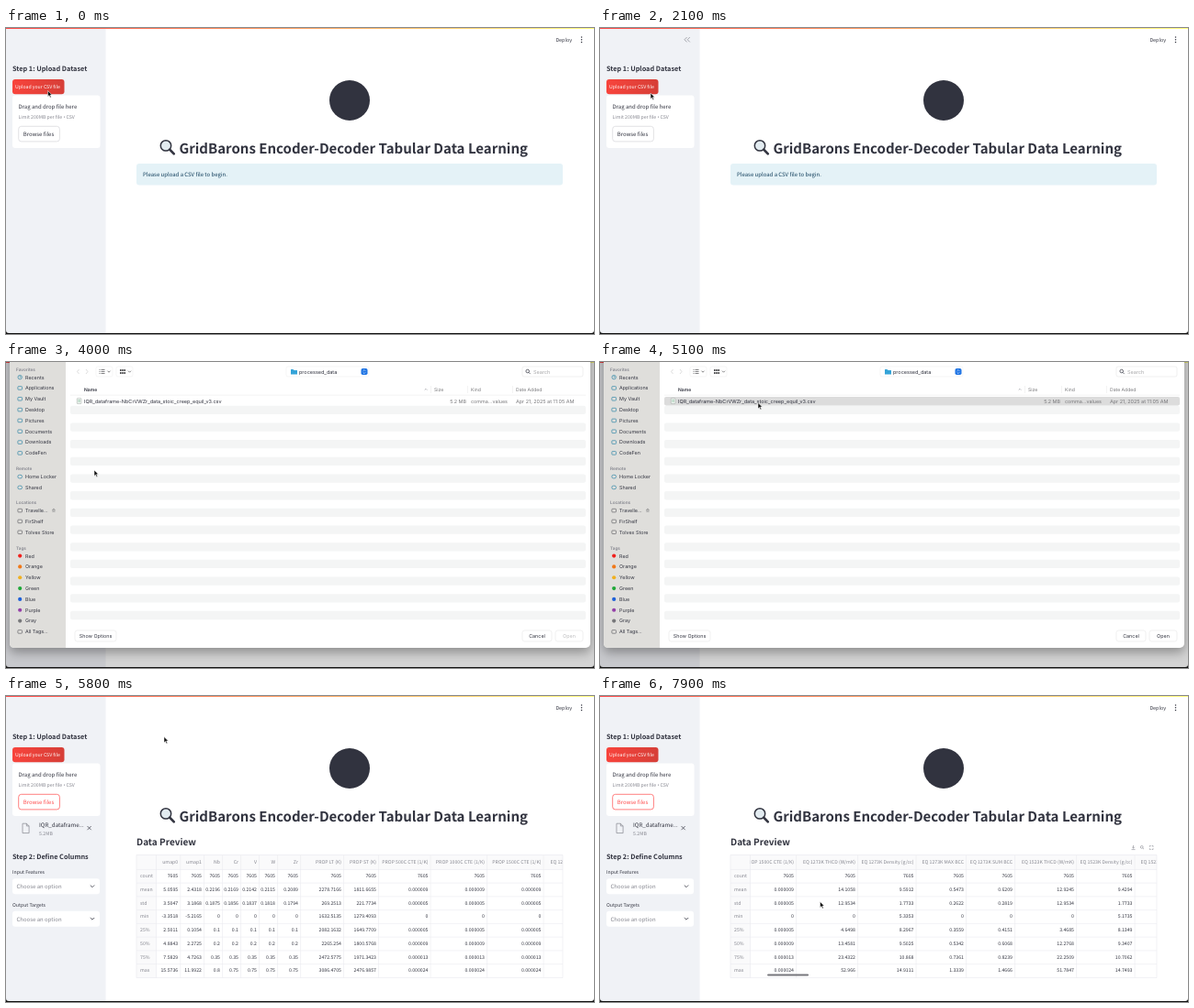
Animation of 640 by 334 pixels, one loop 8 s. Source, as an HTML page:

```html
<!DOCTYPE html>
<html lang="en">
<head>
<meta charset="utf-8">
<title>Upload and preview</title>
<style>
html, body { margin: 0; width: 100%; height: 100%; overflow: hidden; background: #fff; }
svg { display: block; width: 100%; height: 100%; text-rendering: geometricPrecision; }
text { white-space: pre; }
#page { font-family: "Noto Sans CJK SC", "Noto Sans CJK JP", "Noto Sans CJK", "Open Sans", sans-serif; }
#dialog { font-family: Inter, Roboto, sans-serif; }
#sheet { filter: drop-shadow(0 5px 6px #0005); }
</style>
</head>
<body>
<svg id="stage" viewBox="0 0 640 334"></svg>
<script>
const LOOP = 8000, STEP = 100;
const INK = '#31333f', MUTED = '#85868f', RED = '#ff4b4b', GRID = '#e9eaee', PANEL = '#f0f2f6';
const LABEL = '#77777a', EDGE = '#e6e6e6';

// Markup helpers
const text = (x, y, str, size = 6, fill = INK, more = '') =>
  `<text x="${x}" y="${y}" font-size="${size}" fill="${fill}" ${more}>${str}</text>`;
const rect = (x, y, w, h, fill, r = 0, more = '') =>
  `<rect x="${x}" y="${y}" width="${w}" height="${h}" rx="${r}" fill="${fill}" ${more}/>`;
const line = (d, stroke = INK, width = 0.7, more = '') =>
  `<path d="${d}" fill="none" stroke="${stroke}" stroke-width="${width}" ${more}/>`;
const circle = (x, y, r, fill, more = '') =>
  `<circle cx="${x}" cy="${y}" r="${r}" fill="${fill}" ${more}/>`;
const group = (id, body) => `<g id="${id}">${body}</g>`;
const outline = (color, width = 0.6) => `stroke="${color}" stroke-width="${width}"`;
const BOLD = 'font-weight="700"', END = 'text-anchor="end"';

// Statistics: every cell follows from the mean, spread and rounding of its column
const column = (name, width, mean, std, step = 1e-4, floor = 0) => ({ name, width, mean, std, step, floor });
const columns = [
  column('umap0', 26.3, 5.0595, 3.5047, 1e-4, -9),
  column('umap1', 25.8, 2.4318, 3.1868, 1e-4, -9),
  ...['Nb', 'Cr', 'V', 'W'].map((name, i) => column(name, 20, 0.2196 - i * 0.0027, 0.1875 - i * 0.0019, 0.05)),
  column('Zr', 25, 0.2089, 0.1794, 0.05),
  column('PROP LT (K)', 47, 2278.7166, 269.2513),
  column('PROP ST (K)', 38, 1811.6655, 221.7734),
  ...[500, 1000, 1500].map(c => column(`PROP ${c}C CTE (1/K)`, 41.5 + 5 * `${c}`.length, 9e-6, 5e-6, 1e-6)),
  ...[1273, 1523].flatMap((k, i) => [
    column(`EQ ${k}K THCD (W/mK)`, 67, 14.1058 - i * 1.1813, 12.9534),
    column(`EQ ${k}K Density (g/cc)`, 63.5, 9.5912 - i * 0.1618, 1.7733),
    column(`EQ ${k}K MAX BCC`, 54.5, 0.5473, 0.2622),
    column(`EQ ${k}K SUM BCC`, 53, 0.6209, 0.2819)
  ])
];
const spread = z => c => Math.max(c.floor, Math.round((c.mean + z * c.std) / c.step) * c.step);
const rows = {
  count: () => 7605, mean: c => c.mean, std: c => c.std, min: spread(-2.4),
  '25%': spread(-0.73), '50%': spread(-0.05), '75%': spread(0.72), max: spread(3)
};
const format = v => `${+v.toFixed(v < 1e-3 ? 6 : 4)}`;

function table() {
  const left = 142, top = 173.5, body = 163.5, right = 606, bottom = 307.5, pitch = 14.75;
  const rowY = i => 198.2 + i * pitch;
  let cells = '', labels = '', rules = `M${left} ${top}H${right}V${bottom}H${left}ZM${body} ${top}V${bottom}`;
  let edge = body;
  for (const c of columns) {
    edge += c.width;
    cells += text(edge - 2.6, 183.4, c.name, 5.2, MUTED, END) + line(`M${edge} ${top}V${bottom}`, GRID, 0.6);
    Object.values(rows).forEach((stat, i) => cells += text(edge - 2.6, rowY(i), format(stat(c)), 5.2, INK, END));
  }
  Object.keys(rows).forEach((label, i) => {
    rules += `M${left} ${189.4 + i * pitch}H${right}`;
    labels += text(146, rowY(i), label, 5.2, MUTED);
  });
  return rect(left, top, right - left, 16, '#fafafb') + rect(left, top, body - left, bottom - top, '#fafafb') +
    `<clipPath id="tableView">${rect(body, top, right - body, bottom - top, '#fff')}</clipPath>` +
    `<g clip-path="url(#tableView)">${group('cells', cells)}</g>` + labels + line(rules, GRID, 0.6) +
    rect(0, 303.6, 45, 2, '#77777c', 1, 'id="scrollbar"');
}

const selectBox = (label, y) => text(7, y, label, 5.2) + rect(7, y + 5, 95, 17, '#fff', 3) +
  text(11.5, y + 15.8, 'Choose an option', 6, MUTED) + line(`M91.8 ${y + 12.3}l2.2 2.2l2.2-2.2`, INK, 0.8);

const page = () => rect(0, 0, 640, 334, '#fff') + rect(0, 0, 108.5, 334, PANEL) + rect(0, 0, 640, 1, 'url(#ribbon)') +
  text(616, 15, 'Deploy', 5.4, INK, END) + [10, 12.7, 15.4].map(y => circle(626.5, y, 0.75, INK)).join('') +
  group('collapse', line('M94.6 10l-2.6 2.7l2.6 2.7M97.8 10l-2.6 2.7l2.6 2.7', MUTED)) +
  text(7, 46.7, 'Step 1: Upload Dataset', 7.3, INK, BOLD) +
  rect(7, 56, 56.5, 16.3, 'url(#button)', 3) + text(10, 66, 'Upload your CSV file', 5.2, '#fff', 'font-weight="500"') +
  rect(7, 73.5, 95.5, 57.5, '#fff', 3) + text(13.5, 88.2, 'Drag and drop file here') +
  text(13.5, 98.8, 'Limit 200MB per file <tspan font-family="Open Sans, sans-serif">•</tspan> CSV', 5.2, MUTED) +
  rect(13.7, 107.3, 44.7, 16.6, '#fff', 3, 'id="browseBox" stroke-width=".7"') +
  text(18.7, 117.8, 'Browse files', 6, INK, 'id="browseText"') +
  circle(374, 79, 22, INK) +
  circle(174, 128.4, 5.7, '#e2ebf0', outline(INK, 1.5)) + line('M178.2 132.6l4.6 4.8', INK, 2.6, 'stroke-linecap="round"') +
  text(568, 136.6, 'GridBarons Encoder-Decoder Tabular Data Learning', 15, INK, BOLD + ' ' + END) +
  group('notice', rect(142, 148, 464, 23.4, '#e4f2f7', 3) + text(149, 161.8, 'Please upload a CSV file to begin.', 6, '#123f5c')) +
  group('file', line('M18 139.2h4.4l2.7 2.7v7.7h-7.1zM22.4 139.2v2.7h2.7', MUTED) +
    text(36, 143.2, 'IQR_dataframe...', 6.2) + text(36, 152, '5.2MB', 5.2, MUTED) +
    line('M88.5 142l4.2 4.2M92.7 142l-4.2 4.2', INK)) +
  group('preview', text(7, 178, 'Step 2: Define Columns', 7.3, INK, BOLD) +
    selectBox('Input Features', 194.2) + selectBox('Output Targets', 229.7) +
    text(142, 163.2, 'Data Preview', 10, INK, BOLD) + table()) +
  group('anchor', line('M214.4 159h-1.2a1.6 1.6 0 0 0 0 3.2h1.2M216 159h1.2a1.6 1.6 0 0 1 0 3.2h-1.2M213.6 160.6h3.2', MUTED, 0.6)) +
  group('tools', line('M580.5 163v3.2m-1.3-1.3l1.3 1.3l1.3-1.3M578.5 167.6h4M592 167.2l-1.3-1.3M598.3 164.8v-1.3h1.3M600.7 163.5h1.3v1.3M602 166.2v1.3h-1.3M599.6 167.5h-1.3v-1.3', MUTED, 0.6) +
    circle(589.7, 164.9, 1.4, 'none', outline(MUTED)));

// File picker sidebar: heading, baseline, items
const places = [
  ['Favorites', 9.5, ['Recents', 'Applications', 'My Vault', 'Desktop', 'Pictures', 'Documents', 'Downloads', 'CodeFen']],
  ['Remote', 118, ['Home Locker', 'Shared']],
  ['Locations', 155, ['Travelle…', 'FirShelf', 'Tolvex Store']],
  ['Tags', 204.5, ['Red', 'Orange', 'Yellow', 'Green', 'Blue', 'Purple', 'Gray', 'All Tags…']]
];
const tagColors = ['#f0201c', '#f07818', '#f0b020', '#1ea838', '#1e60d8', '#9440a8', '#77777a'];

function placeIcon(section, i, y) {
  if (section === 3 && i < 7) return circle(15.2, y, 2.1, tagColors[i]);
  const color = outline(section < 2 ? '#2f86a6' : '#66666a', 0.7);
  if (section === 0 && i === 0) return circle(15.2, y, 2.2, 'none', color) + line(`M15.2 ${y - 1.4}v1.4h1.2`, '#2f86a6', 0.6);
  return rect(12.9, y - 1.8, 4.6, 3.6, 'none', section === 1 ? 1.6 : 0.7, color);
}

const button = (x, w, label, more = '') => rect(x, 293, w, 12, '#fff', 2.5, outline(EDGE)) +
  text(x + w / 2, 301, label, 5.4, INK, 'text-anchor="middle" ' + more);

function dialog() {
  let out = rect(4, -20, 632, 332, '#fff', 5, 'id="sheet"') + '<path d="M4-20H65V312H9Q4 312 4 307Z" fill="#dfdedb"/>';
  places.forEach(([heading, y, items], section) => {
    out += text(11, y, heading, 4.7, MUTED, 'font-weight="600"');
    items.forEach((item, i) => {
      const base = y + 9 + i * 11.83;
      out += placeIcon(section, i, base - 1.9) + text(21, base, item, 5.4);
    });
  });
  out += line('M53.5 163.2h-3.2M50.4 161.9l1.5-2l1.5 2z', '#66666a', 0.5);
  out += line('M79.5 8l-2 2.5l2 2.5M87 8l2 2.5l-2 2.5', '#cfcfcf') +
    rect(98, 5, 18, 11, 'none', 2, outline('#f0f0f0')) + rect(120, 5, 18, 11, 'none', 2, outline('#f0f0f0')) +
    line('M101.5 8.5h1M103.5 8.5h4M101.5 10.5h1M103.5 10.5h4M101.5 12.5h1M103.5 12.5h4M110.5 9.7l1.5 1.5l1.5-1.5M133 9.7l1.5 1.5l1.5-1.5', '#4a4a4c') +
    line('M124 9h6M124 12h6', '#4a4a4c', 1.8, 'stroke-dasharray="1.6 .6"') +
    rect(305, 5, 90, 11, '#fff', 2, outline('#f0f0f0')) +
    '<path d="M310 8h2.6l.8.9h3.6v4.6h-7z" fill="#35a4d8"/>' + text(319, 12.6, 'processed_data', 5.5) +
    rect(386.5, 7, 7, 7, '#1f74e4', 1.8) + line('M388.7 9.8l1.3-1.3l1.3 1.3M388.7 11.3l1.3 1.3l1.3-1.3', '#fff', 0.6) +
    rect(562, 5, 66, 11, '#fff', 2, outline(EDGE)) + circle(567.7, 10, 1.8, 'none', outline(INK, 0.7)) +
    line('M569 11.4l1.7 1.7') + text(574, 12.6, 'Search', 5.5, '#a8a8aa') +
    text(85, 31.6, 'Name', 5, INK, 'font-weight="600"') + line('M455.7 30.6l1.3-1.3l1.3 1.3', MUTED, 0.6);
  [['Size', 466], ['Kind', 506], ['Date Added', 555]].forEach(([name, x]) =>
    out += text(x, 31.6, name, 5.1, LABEL) + line(`M${x - 3.5} 26v8`, EDGE, 0.5));
  out += line('M70 36.2H631', EDGE, 0.5);
  for (let i = 0; i < 13; i++) out += rect(70, 47.7 + i * 18.68, 561, 9.3, '#f4f5f5', 2);
  return out + rect(70, 38, 561, 9.5, '#dcdcdc', 2, 'id="selection"') +
    rect(77.3, 39.7, 4.6, 5.8, '#fff', 0.5, outline('#8a9a90', 0.5)) + line('M78.3 41.6h2.6M78.3 43.3h2.6', '#4a9a68', 0.6) +
    text(85, 44.6, 'IQR_dataframe-NbCrVWZr_data_stoic_creep_equil_v3.csv', 5.5) +
    text(501, 44.6, '5.2 MB', 5.4, LABEL, END) + text(506, 44.6, 'comma…values', 5.4, LABEL) +
    text(555, 44.6, 'Apr 21, 2025 at 11:05 AM', 5.45, LABEL) +
    button(75, 45, 'Show Options') + button(562, 32, 'Cancel') + button(598, 30, 'Open', 'id="open"');
}

const gradient = (id, from, to) =>
  `<linearGradient id="${id}"><stop stop-color="${from}"/><stop offset="1" stop-color="${to}"/></linearGradient>`;

document.getElementById('stage').innerHTML =
  gradient('ribbon', '#ff4b4b', '#fffd80') + gradient('button', '#f8443c', '#d63f38') +
  group('page', page()) + rect(0, 0, 640, 334, '#000', 0, 'id="backdrop"') + group('dialog', dialog()) +
  '<path d="M0 330Q0 333 3 333H637Q640 333 640 330V334H0Z" fill="#111"/>' +
  group('cursor',
    group('arrow', '<path d="M0 0V6.4L1.5 5L2.6 7.4L3.7 6.9L2.6 4.6H4.6Z" fill="#111" stroke="#fff" stroke-width=".5"/>') +
    group('hand', '<path d="M-1.5 0.6Q-.8-.4 0 .6L.5 3L3 3.5Q3.8 4 3.3 5.5L2.6 7.4H-.8L-2.8 4.6Q-2.6 3.8-1.2 4.6Z" fill="#fff" stroke="#222" stroke-width=".7"/>') +
    group('beam', line('M-1.5-3.2Q0-3.2 0-2.2Q0-3.2 1.5-3.2M0-2.2V2.2M-1.5 3.2Q0 3.2 0 2.2Q0 3.2 1.5 3.2', '#111', 0.8)));

// Motion
const $ = id => document.getElementById(id);
const ramp = (t, from, to) => Math.max(0, Math.min(1, (t - from) / (to - from)));
const ease = v => v * v * (3 - 2 * v);
const set = (id, attributes) => Object.entries(attributes).forEach(([name, v]) => $(id).setAttribute(name, v));
const show = (id, on) => set(id, { display: on ? 'inline' : 'none' });
const path = [
  [0, 45.5, 68.5], [500, 47, 69.5], [2100, 55, 71], [3000, 54, 74], [3600, 39, 111.5], [3800, 39, 111.5],
  [4000, 96, 118], [4800, 172, 44.5], [6400, 172, 44.5], [6900, 160.3, 155], [7300, 239.5, 224.5], [LOOP, 239.5, 224.5]
];

function cursorAt(t) {
  const i = path.findIndex(p => p[0] > t), [t0, x0, y0] = path[i - 1], [t1, x1, y1] = path[i];
  const k = ease(ramp(t, t0, t1));
  return [x0 + (x1 - x0) * k, y0 + (y1 - y0) * k];
}

function draw(t) {
  const [x, y] = cursorAt(t);
  const opacity = ramp(t, 3820, 3980) * (1 - ramp(t, 5240, 5440));
  const selected = t >= 5000, loaded = t >= 5800;
  const hover = t > 3800 || (x > 13 && x < 59 && y > 107);
  const scroll = 371.5 * ease(ramp(t, 7250, 7900));

  show('collapse', t >= 500 && t < 3900);
  set('browseBox', { stroke: hover ? RED : '#d6d6da' });
  set('browseText', { fill: hover ? RED : INK });

  show('dialog', opacity > 0);
  set('dialog', { opacity, transform: `translate(0 ${-12.5 * (1 - opacity)})` });
  set('backdrop', { opacity: 0.17 * Math.sqrt(opacity) });
  show('selection', selected);
  set('open', { fill: selected ? INK : '#bdbdbf' });

  show('notice', !loaded);
  show('file', t >= 5600);
  show('preview', loaded);
  show('anchor', loaded && y > 148 && y < 168);
  show('tools', loaded && y >= 168);
  set('cells', { transform: `translate(${-scroll} 0)` });
  show('scrollbar', scroll > 0);
  set('scrollbar', { x: 163.5 + scroll * 0.05 });

  const hand = t >= 5300 && t < 5800, beam = loaded && y > 120 && y < 168;
  set('cursor', { transform: `translate(${x} ${y})` });
  show('hand', hand);
  show('beam', beam);
  show('arrow', !hand && !beam);
}

function tick() {
  draw(Math.floor(performance.now() % LOOP / STEP) * STEP);
  requestAnimationFrame(tick);
}
tick();
</script>
</body>
</html>
```
